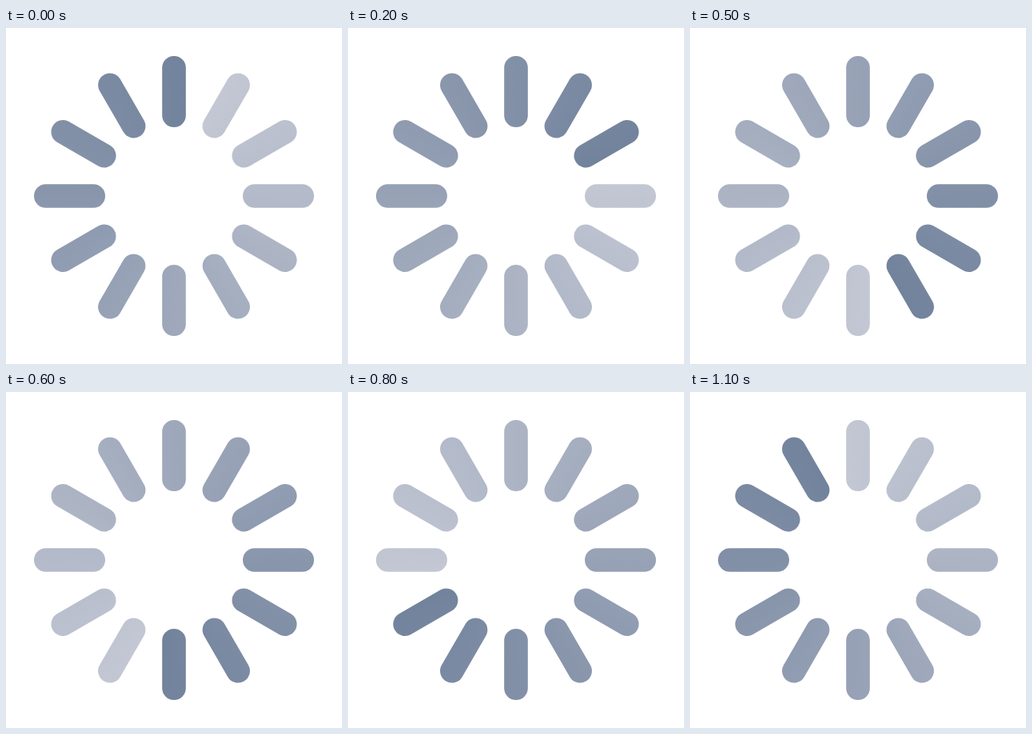
Recreate the animation shown at these times as an HTML page with a canvas. Size 420x420 px, loop 1200 ms.

```html
<!DOCTYPE html>
<html lang="en">
<head>
<meta charset="utf-8">
<title>Spinner</title>
<style>
  html, body { margin: 0; width: 100%; height: 100%; overflow: hidden; background: #fff; }
  canvas { display: block; width: 420px; height: 420px; }
</style>
</head>
<body>
<canvas id="stage" width="420" height="420"></canvas>
<script>
const SIZE = 420, CENTER = SIZE / 2;
const BARS = 12, STEP_MS = 100;
const TURN = 2 * Math.PI / BARS;
const INNER = 100.8, OUTER = 160.2, WIDTH = 29.6;
const LIGHT = '#c5c9d5', DARK = '#70819b';

const ctx = document.getElementById('stage').getContext('2d');
ctx.lineCap = 'round';
ctx.lineWidth = WIDTH;

// Clockwise sweep from light to dark; the darkest bar is the leading one.
function sweep(head) {
  const gradient = ctx.createConicGradient((head + 0.5) * TURN - Math.PI / 2, CENTER, CENTER);
  gradient.addColorStop(0, LIGHT);
  gradient.addColorStop(1, DARK);
  return gradient;
}

function draw(time) {
  const head = Math.floor(time / STEP_MS) % BARS;
  ctx.clearRect(0, 0, SIZE, SIZE);
  ctx.strokeStyle = sweep(head);
  ctx.beginPath();
  for (let i = 0; i < BARS; i++) {
    const x = Math.sin(i * TURN), y = -Math.cos(i * TURN);
    ctx.moveTo(CENTER + x * INNER, CENTER + y * INNER);
    ctx.lineTo(CENTER + x * OUTER, CENTER + y * OUTER);
  }
  ctx.stroke();
}

const start = performance.now();
function tick(now) {
  draw(Math.max(0, now - start));
  requestAnimationFrame(tick);
}
draw(0);
requestAnimationFrame(tick);
</script>
</body>
</html>
```
